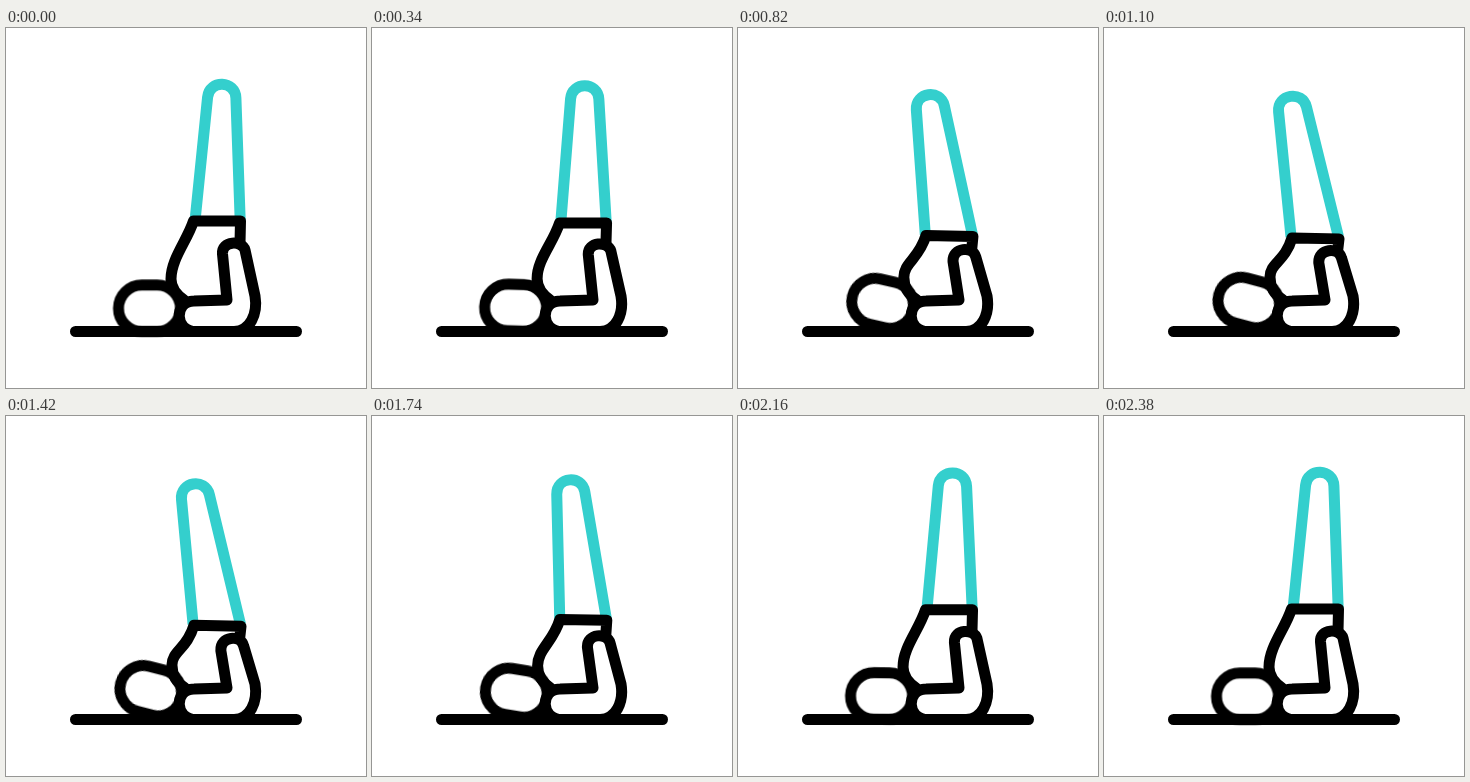
Recreate the animation shown at these times as an HTML page. Size 360 by 360 pixels, loop 2400 ms.

```html
<!DOCTYPE html>
<html lang="en">
<head>
<meta charset="utf-8">
<title>Shoulder stand</title>
<style>
  html, body { margin: 0; width: 100%; height: 100%; overflow: hidden; background: #fff; }
  svg { display: block; width: 100%; height: 100%; }
  svg * {
    fill: none;
    stroke: #000;
    stroke-width: 11px;
    stroke-linecap: round;
    stroke-linejoin: round;
    animation: 2.4s cubic-bezier(.6, 0, .4, 1) infinite;
  }
  .legs { stroke: #34cfcd; stroke-linecap: butt; animation-name: legs; }
  .torso { animation-name: torso; }
  .head { animation-name: head; }
  .arm { fill: #fff; animation-name: arm; }

  @keyframes legs {
    0%, 100% { d: path("M189 193L201.6 69.1C203.4 51.5 229.3 52.4 229.9 70L234.2 193"); }
    50% { d: path("M187 209L174.4 83.9C172.6 66.3 198 62 202.3 79.1L234.5 209"); }
  }
  @keyframes torso {
    0%, 100% { d: path("M178 272C171 267 165 260 165 251C165 231 181 213 187.5 193L234.5 193L234 215"); }
    50% { d: path("M179 272C171 267 166 260 166 249C166 235 181 234 188 210L235 211L233.5 224"); }
  }
  @keyframes head {
    0%, 100% { transform: translate(143.5px, 280.3px) rotate(0deg); }
    50% { transform: translate(144.8px, 274.5px) rotate(15deg); }
  }
  @keyframes arm {
    0%, 100% { d: path("M188 273L221 272L216.5 226C215.5 212.5 236 212 239 222L249 268C252 286 244 303.5 228 303.5L190 303.5C168 303.5 168 273 188 273Z"); }
    50% { d: path("M188 273L221 272L214.8 235C214 220 234.5 219 237.5 230L249 268C252 286 244 303.5 228 303.5L190 303.5C168 303.5 168 273 188 273Z"); }
  }
</style>
</head>
<body>
<svg viewBox="0 0 360 360">
  <path class="legs"/>
  <path class="torso"/>
  <rect class="head" x="-31" y="-23.3" width="62" height="46.6" rx="23.3"/>
  <path class="arm"/>
  <path d="M69.5 303.5H290.5"/>
</svg>
</body>
</html>
```
